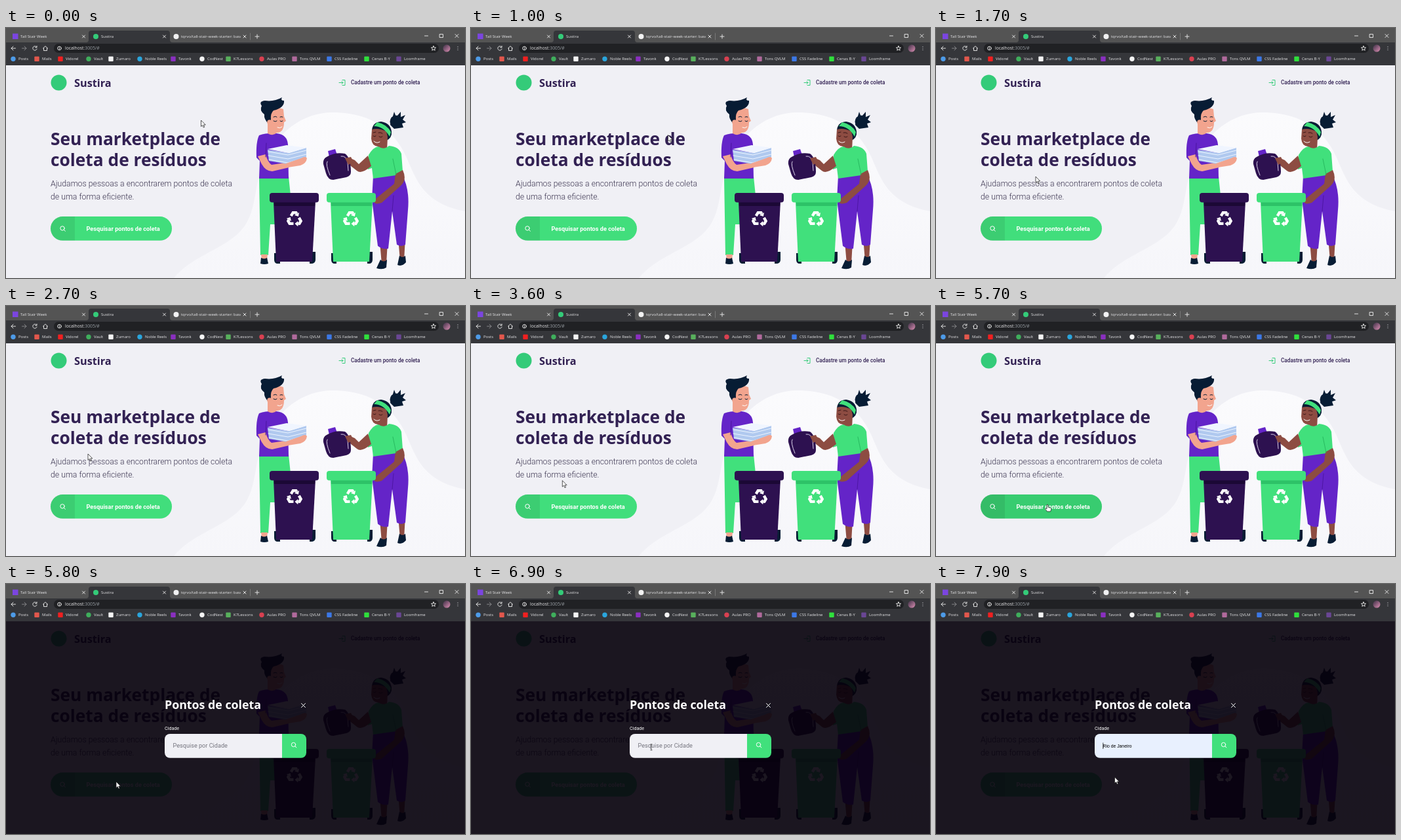
Write an HTML page that moves like this. It is 700 px wide and 382 px high and loops after 8 s.

```html
<!DOCTYPE html>
<html lang="pt-BR">
<head>
<meta charset="utf-8">
<title>Sustira</title>
<style>
  html, body { margin: 0; width: 100%; height: 100%; overflow: hidden; background: #f0f0f5; }
  svg { display: block; width: 100vw; height: 100vh; }
  .ui { font: 6px "Open Sans", "Noto Sans", sans-serif; fill: #e6e6e8; }
  .title { font-family: "Open Sans", "Noto Sans", sans-serif; font-weight: 700; }
  .body { font-family: Roboto, sans-serif; }
  .line { fill: none; stroke-width: 1; stroke-linecap: round; stroke-linejoin: round; }
  .navy { fill: #071c34; }
  .plum { fill: #2d1150; }
  .violet { fill: #6424c8; }
  .green { fill: #41e07c; }
  .peach { fill: #f2a48e; }
  .brown { fill: #8d4c42; }
</style>
</head>
<body>
<svg viewBox="0 0 700 382" preserveAspectRatio="none">
  <defs>
    <linearGradient id="glow" x1="0" y1="0" x2="0" y2="1">
      <stop offset="0" stop-color="#fbfbfd"/>
      <stop offset="1" stop-color="#f6f6fa"/>
    </linearGradient>
    <linearGradient id="avatar" x1="0" y1="0" x2="1" y2="1">
      <stop offset="0" stop-color="#3c2f45"/>
      <stop offset="1" stop-color="#dd8fb4"/>
    </linearGradient>
    <g id="bend">
      <path d="M-4.6-4.2-2-8.6H2L3-7" fill="none" stroke="#fff" stroke-width="3.7"/>
      <path d="M6.1-8.8-.1-5.2 5.1-3.4Z" fill="#fff"/>
    </g>
    <g id="recycle" transform="scale(1.15)">
      <use href="#bend"/>
      <use href="#bend" transform="rotate(120)"/>
      <use href="#bend" transform="rotate(240)"/>
    </g>
    <g id="lens" class="line" stroke="#fff">
      <circle r="3.2"/>
      <path d="M2.4 2.4 4.4 4.4"/>
    </g>
    <clipPath id="tabClip"><path d="M255 4h103v16h-103z"/></clipPath>
  </defs>

  <!-- page -->
  <g>
    <path fill="#f0f0f5" d="M0 57h700v325H0z"/>
    <path fill="url(#glow)" d="M256 382C282 350 326 340 354 314C384 286 376 246 392 208C412 160 452 129 498 129C552 129 590 152 610 196C626 232 636 268 700 280V382Z"/>

    <circle cx="80.5" cy="83.5" r="12" fill="#34cb79"/>
    <text class="title" x="104" y="90" font-size="16.3" fill="#322153">Sustira</text>
    <path class="line" stroke="#34cb79" d="M513 79.500h4v8h-4M508 83.500h6M512 81.500l2 2-2 2"/>
    <text class="body" x="526" y="86.300" font-size="8.2" font-weight="500" fill="#322153">Cadastre um ponto de coleta</text>

    <g class="title" font-size="26.3" fill="#322153">
      <text x="68" y="179">Seu marketplace de</text>
      <text x="68" y="211">coleta de resíduos</text>
    </g>
    <g class="body" font-size="12.3" font-weight="300" fill="#3b3450">
      <text x="68" y="242">Ajudamos pessoas a encontrarem pontos de coleta</text>
      <text x="68" y="262">de uma forma eficiente.</text>
    </g>

    <rect id="button" x="68" y="288" width="185" height="36.800" rx="18.400"/>
    <path fill="#000" fill-opacity=".08" d="M105 288v36.800H86.400a18.400 18.400 0 0 1 0-36.800z"/>
    <use href="#lens" x="86" y="306"/>
    <text class="body" x="122.500" y="309.500" font-size="9.2" font-weight="700" fill="#fff">Pesquisar pontos de coleta</text>

    <!-- man -->
    <g>
      <path class="green" d="M386 227H431L434 256V300H403L400 347H388Z"/>
      <path class="peach" d="M389 346h10l-1 8h-8z"/>
      <path class="navy" d="M389 351q5 3 9 0l2 9q-6 2-12 0z"/>
      <path class="violet" d="M386 164Q397 160 413 161Q429 163 430 178L431 230H386L387 203L382 198Q381 174 386 164Z"/>
      <path class="peach" d="M399 146h14v14q-6 6-14 1z"/>
      <path class="peach" d="M400 126Q412 119 423 124L424 135L427 142L424 144Q424 159 414 160Q402 158 400 142Z"/>
      <path class="navy" d="M400 146Q393 139 394 132Q386 126 390 119Q385 112 395 111Q409 113 421 106Q418 111 424 111Q425 122 408 126Q403 130 404 141Z"/>
      <circle class="peach" cx="402" cy="144" r="3.800"/>
      <path class="line" stroke="#071c34" d="M408 142q3 2 5 0M418 142q2 2 4 0M408 136q3-2 5 0M418 136q2-1 4 0"/>
      <path class="line" stroke="#fff" stroke-width="1.500" d="M414 152q4 2 7-1"/>
      <path class="peach" d="M384 196L396 193Q399 205 405 209L432 205L432 213L406 219Q396 219 390 208Z"/>
      <path class="line" stroke="#4a159e" d="M397 176L396 197"/>
      <path fill="#b0c9ef" d="M399 186L432 191L458 183V198L430 208L401 203Z"/>
      <path fill="#f0f5ff" d="M399 185L428 179L458 183L430 191Z"/>
      <path class="line" stroke="#edf4ff" stroke-width="2" d="M400 189L430 194L458 187M400 195L430 200L458 193M401 201L430 206L458 198"/>
      <path class="peach" d="M450 199Q457 195 459 199Q458 207 449 210L430 213L427 207Z"/>
    </g>

    <!-- woman -->
    <g>
      <path class="brown" d="M570 326h12l-2 35h-7zM598 320h11l-2 36h-6z"/>
      <path class="navy" d="M571 354q5 5 10 0l-1 12q-6 4-15 1zM600 348q5 4 9 0l1 10q-6 7-13 4z"/>
      <path class="violet" d="M560 226Q582 220 604 224Q616 246 613 278L609 331Q603 335 596 331L589 280L583 337Q575 339 567 333L558 262Z"/>
      <path class="line" stroke="#4d17a3" d="M589 280L591 256"/>
      <circle class="navy" cx="595" cy="143" r="9.500"/>
      <path class="navy" d="M586 148L592 128L595 136L602 128L602 136L609 133L605 140L610 144L604 146L606 152L592 154Z"/>
      <path class="navy" d="M558 158Q558 144 572 143Q586 145 588 158Q589 168 580 172Z"/>
      <path class="brown" d="M558 155Q568 152 580 158L582 166L581 188H568L567 181Q558 180 557 169Z"/>
      <path class="green" d="M561 150Q576 150 585 166L587 159Q581 147 566 144Z"/>
      <path class="line" stroke="#3a1718" d="M560 165q2 2 4 0M569 166q3 2 5 0M560 160l4-1M568 160q3-1 6 1"/>
      <path class="line" stroke="#fff" stroke-width="2" d="M561 173q4 4 9 1"/>
      <path class="green" d="M553 194Q560 182 568 181Q576 187 584 180Q599 181 603 192L605 219L595 225L560 230L558 214L552 216Z"/>
      <path class="brown" d="M552 195L557 211Q542 224 535 218L521 207Q517 201 523 198L532 202L538 208Z"/>
      <path class="brown" d="M594 223L605 217Q612 232 602 241L573 267Q562 271 560 264L592 238Z"/>
      <path class="line" stroke="#27ba60" d="M590 200L595 224"/>
    </g>

    <!-- jug -->
    <g>
      <path class="violet" d="M491 188L502 185L505 194L493 197Z"/>
      <path class="plum" d="M489 197Q502 189 517 192Q526 198 526 220Q526 226 519 228L499 232Q491 232 488 222L484 208Q483 200 489 197Z"/>
      <path class="line" stroke="#d8cfe8" stroke-width="1.200" d="M490 204Q487 208 494 225M511 196Q519 195 521 205L522 218"/>
      <path class="brown" d="M517 199l9-2 4 8-8 4z"/>
    </g>

    <!-- bins -->
    <g class="plum">
      <path class="navy" d="M409 344h9v16h-5q-4-1-4-6zM463 342h9v12q0 5-5 6h-4z"/>
      <path d="M408 265h64l-5 92H412z"/>
      <path fill="#1b0835" d="M409 265h62v7H409z"/>
      <rect x="402" y="252" width="75" height="14.500" rx="4"/>
      <use href="#recycle" x="0" y="0" transform="translate(440 292)"/>
    </g>
    <g class="green">
      <path class="navy" d="M496 344h8v16h-4q-4-1-4-6zM551 342h8v12q0 5-4 6h-4z"/>
      <path d="M495 265h64l-5 92H499z"/>
      <path fill="#2dc267" d="M496 265h62v7H496z"/>
      <rect x="489" y="252" width="75" height="14.500" rx="4"/>
      <use href="#recycle" transform="translate(526 292)"/>
    </g>
  </g>

  <!-- search dialog -->
  <g id="dialog">
    <path fill="#06000c" fill-opacity=".91" d="M0 57h700v325H0z"/>
    <text class="title" x="242" y="191" font-size="17.800" fill="#fff">Pontos de coleta</text>
    <path class="line" stroke="#fff" stroke-width="1.300" d="M450.500 182.500l6 6m0-6l-6 6"/>
    <text class="body" x="242" y="222.500" font-size="7.150" fill="#fff">Cidade</text>
    <path id="field" d="M421 229v36.800H250a8 8 0 0 1-8-8V237a8 8 0 0 1 8-8z"/>
    <path class="green" d="M421 229h29a8 8 0 0 1 8 8v20.800a8 8 0 0 1-8 8h-29z"/>
    <use href="#lens" x="438.500" y="245.500"/>
    <text id="hint" class="body" x="254.500" y="250" font-size="9.150" fill="#75757f">Pesquise por Cidade</text>
    <text id="city" x="254.500" y="249.700" font-size="6.830" font-family="Liberation Sans, Arial, sans-serif" fill="#000">Rio de Janeiro</text>
    <path id="caret" stroke="#111" stroke-width=".8" d="M254.800 242.500v9.500"/>
  </g>

  <!-- browser frame -->
  <g class="ui">
    <path fill="#545454" d="M0 0h700v23H0z"/>
    <path fill="#35363a" d="M0 22h700v35H0zM122 22q4 0 4-4V8q0-4 4-4h116q4 0 4 4v10q0 4 4 4z"/>
    <rect x="73" y="24" width="587" height="14" rx="7" fill="#202124"/>
    <rect x="10" y="8.500" width="8.500" height="8.500" fill="#7b45e0"/>
    <circle cx="137" cy="13" r="4" fill="#34cb79"/>
    <circle cx="259.500" cy="13" r="4" fill="#f2f2f2"/>
    <text x="22" y="15.200">Tall Stair Week</text>
    <text x="145" y="15.200">Sustira</text>
    <text x="267" y="15.200" clip-path="url(#tabClip)">tqrvo/tall-stair-week-starter: base</text>
    <g class="line" stroke="#e0e0e0" stroke-width=".8">
      <path d="M116.500 11l4 4m0-4l-4 4M239.500 11l4 4m0-4l-4 4M362 11l4 4m0-4l-4 4M380 13h6m-3-3v6"/>
      <path d="M638.500 12h5M661.500 9.500h5v5h-5zM685 9.500l5 5m0-5l-5 5"/>
      <path stroke="#777" d="M372.500 8v10"/>
      <path d="M14.500 31h-6.500m3-3l-3 3 3 3"/>
      <path stroke="#858588" d="M24.500 31h6.500m-3-3l3 3-3 3"/>
      <path d="M46.600 29a3.200 3.200 0 1 0 .5 3M47 27.500v2.300h-2.300"/>
      <path d="M56.500 31l3.500-3.300 3.500 3.300M57.500 30.500v4h5v-4"/>
      <circle cx="81.500" cy="31" r="2.800"/>
      <path d="M81.500 31v1.500M81.500 29.500v.1"/>
      <path d="M652 27.500l1 2.300 2.600.2-2 1.700.6 2.500-2.200-1.400-2.200 1.400.6-2.500-2-1.700 2.600-.2z"/>
    </g>
    <text x="90" y="33.300" font-size="6.800">localhost<tspan fill="#9aa0a6">:3005/#</tspan></text>
    <circle cx="672" cy="31" r="5.500" fill="url(#avatar)"/>
    <path class="line" stroke="#e6e6e8" stroke-width="1.400" d="M689 28.500v0M689 31v0M689 33.500v0"/>
    <g id="bookmarks"></g>
  </g>

  <g id="cursor" fill="#fff" stroke="#111" stroke-width=".7" stroke-linejoin="round">
    <path id="arrow" d="M0 0V9.500L2.200 7.500 3.700 11 5.300 10.300 3.800 7H6.800Z"/>
    <path id="hand" d="M-1 1Q0-.6 1 1V4.500L5 5.500Q6 6 5.700 8L4.700 11H-.5L-3.500 7Q-3.500 5.500-1 7Z"/>
    <path id="beam" fill="none" stroke="#222" d="M-1.500-4.500H1.500M0-4.500V4.500M-1.500 4.500H1.500"/>
  </g>
</svg>
<script>
  const LOOP = 8000, STEP = 100;
  const OPEN = 5800, FOCUS = 7300;
  const $ = id => document.getElementById(id);
  const start = performance.now();

  // label, icon x, colour, shape
  const bookmarks = [
    ["Posts", 11, "#4d9be8", "c"], ["Mails", 47, "#e2574c", "s"],
    ["Vidorel", 83, "#f02020", "s"], ["Vault", 126, "#3fae5c", "c"],
    ["Zumaro", 160, "#f4f4f4", "s"], ["Noble Reels", 204, "#2aa5dc", "c"],
    ["Tavonk", 255, "#8a2fc0", "s"], ["CodNest", 299, "#f4f4f4", "c"],
    ["K7Lessons", 339, "#58b05c", "s"], ["Aulas PRO", 390, "#d94050", "c"],
    ["Tons QVLM", 440, "#b06a9c", "s"], ["CSS Fadeline", 493, "#3c78e6", "s"],
    ["Cenas B-Y", 550, "#2fe03c", "s"], ["Loomframe", 599, "#6a4694", "s"]
  ];
  $("bookmarks").innerHTML = bookmarks.map(([label, x, color, shape]) =>
    `<rect x="${x - 3.7}" y="43.5" width="7.4" height="7.4" rx="${shape === "c" ? 3.7 : 1}" fill="${color}"/>
     <text x="${x + 8}" y="49.400">${label}</text>`).join("");

  // time, x, y of the pointer tip
  const path = [
    [0, 297.5, 141], [700, 297.5, 141], [1000, 300.5, 163.5], [1200, 300.5, 163.5],
    [1300, 152, 227], [2200, 152, 227], [2700, 125, 226], [2900, 118, 232],
    [3000, 118, 232], [3900, 150, 284], [4500, 184, 325], [4800, 182, 335],
    [5300, 170, 303], [5700, 170, 303], [5800, 168, 302], [6000, 168, 302],
    [6400, 200, 286], [7000, 290, 242], [7200, 290, 242], [7900, 272.5, 295]
  ];

  function pointer(t) {
    const i = path.findIndex(k => k[0] > t);
    if (i < 0) return path[path.length - 1].slice(1);
    const [t0, x0, y0] = path[i - 1], [t1, x1, y1] = path[i];
    const p = (t - t0) / (t1 - t0);
    return [x0 + (x1 - x0) * p, y0 + (y1 - y0) * p];
  }

  const inside = (x, y, l, t, r, b) => x >= l && x < r && y >= t && y < b;
  const show = (id, on) => $(id).setAttribute("visibility", on ? "visible" : "hidden");

  function draw(t) {
    const [x, y] = pointer(t);
    const open = t >= OPEN;
    const hover = !open && inside(x, y, 68, 288, 253, 324.8);
    const typing = open && inside(x, y, 242, 229, 421, 266);
    const filled = t >= FOCUS && y > 275;

    $("cursor").setAttribute("transform", `translate(${x} ${y})`);
    show("arrow", !hover && !typing);
    show("hand", hover);
    show("beam", typing);
    $("button").setAttribute("fill", hover ? "#38cc70" : "#41de7c");
    $("dialog").style.display = open ? "" : "none";
    $("field").setAttribute("fill", filled ? "#e8f0fe" : "#f0f0f5");
    show("hint", !filled);
    show("city", filled);
    show("caret", t >= FOCUS);
  }

  function tick() {
    const t = (performance.now() - start) % LOOP;
    draw(Math.floor(t / STEP) * STEP);
    requestAnimationFrame(tick);
  }
  tick();
</script>
</body>
</html>
```
